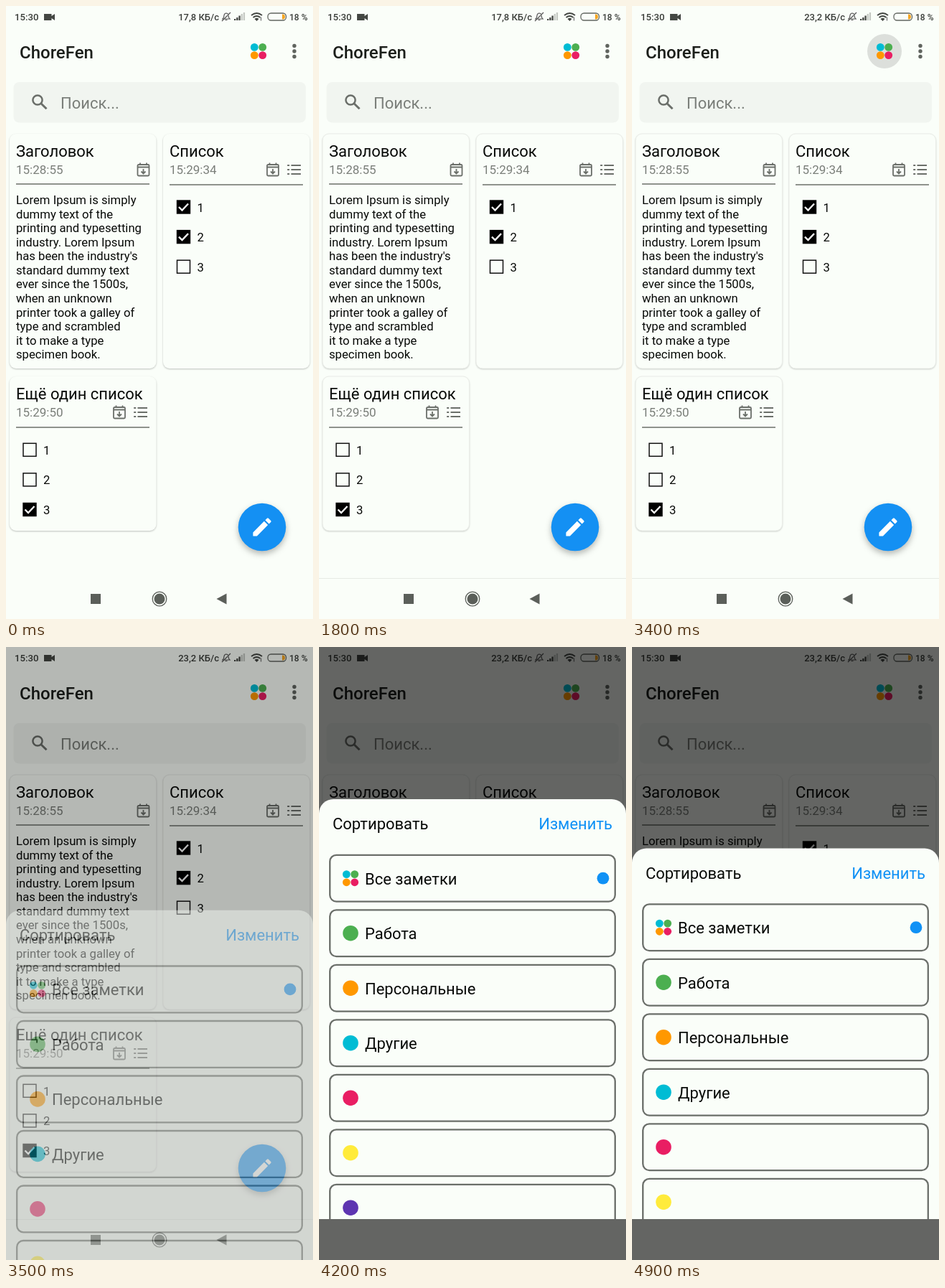
These frames come from a looping animation (428 by 854 pixels, 5000 ms). An HTML page:

```html
<!DOCTYPE html>
<html lang="ru">
<head>
<meta charset="utf-8">
<title>Заметки</title>
<style>
  html, body { margin: 0; width: 100%; height: 100%; overflow: hidden; background: #fafef9; }
  svg { display: block; width: 100vw; height: 100vh; }
  text { font-family: Roboto, "Noto Sans", sans-serif; font-size: 22px; fill: #080a08; white-space: pre; }
  .status { font-size: 13.2px; font-weight: 500; fill: #3b3e3a; }
  .title { font-size: 24px; font-weight: 500; fill: #1c1f1b; }
  .muted { fill: #7a7e79; }
  .small { font-size: 16.7px; }
  .time { font-size: 17px; fill: #7a7e79; }
  .line { fill: none; stroke: #6b6f6a; }
  .paper { fill: #fafef9; }
  .card { fill: #fafef9; filter: drop-shadow(0 1px 1px rgba(0, 0, 0, .24)); }
</style>
</head>
<body>
<svg viewBox="0 0 428 854" preserveAspectRatio="none">
  <defs>
    <g id="categories">
      <circle cx="-5.7" cy="-5.6" r="5.4" fill="#00bcd4"/>
      <circle cx="5.7" cy="-5.6" r="5.4" fill="#4caf50"/>
      <circle cx="-5.7" cy="5.6" r="5.4" fill="#ff9800"/>
      <circle cx="5.7" cy="5.6" r="5.4" fill="#e91e63"/>
    </g>
    <g id="archive" class="line" stroke-width="1.8">
      <rect x="-8" y="-7" width="16" height="15.5" rx="1.5"/>
      <path d="M-8-3.5H8M-4.5-9.5V-7M4.5-9.5V-7M0-1V5M-3 2.5L0 5.5L3 2.5"/>
    </g>
    <g id="list" class="line" stroke-width="2.2">
      <path d="M-9.3-6h3M-9.3 0h3M-9.3 6h3M-4-6H9.5M-4 0H9.5M-4 6H9.5"/>
    </g>
    <rect id="box" x="-9" y="-9" width="18" height="18" fill="none" stroke="#111" stroke-width="1.5"/>
    <g id="boxOn">
      <rect x="-9.7" y="-9.7" width="19.4" height="19.4"/>
      <path d="M-6.5 0L-2 4.5L6.5-4.5" fill="none" stroke="#fff" stroke-width="2.3"/>
    </g>
    <clipPath id="window"><rect width="428" height="797"/></clipPath>
  </defs>

  <rect class="paper" width="428" height="854"/>

  <g id="statusBar" fill="#444743">
    <text class="status" x="12" y="20">15:30</text>
    <path d="M53 11h10.5v3l4.5-3v9l-4.5-3v3H53z"/>
    <text class="status" id="speed" x="297" y="20" text-anchor="end" style="font-size:13px"></text>
    <path d="M302 18q2-2 2-5q.5-3 3-3t3 3q0 3 2 5zM305.500 19.500h3M301 21L313 9" fill="none" stroke="#555" stroke-width="1.2"/>
    <path d="M318 20v-2h2.300v2zM321.200 20v-4h2.300v4zM324.400 20v-6.500h2.300v6.500z"/>
    <path d="M327.600 20v-9h2.300v9zM330.800 20V9h2.300v11z" fill="#c5c9c3"/>
    <path d="M342 13q7.500-6 15 0M344.500 16q5-4 10 0" fill="none" stroke="#444743" stroke-width="1.8"/>
    <path d="M346.500 18q3-2.400 6 0l-3 3z"/>
    <path d="M355.500 15.500v5" stroke="#777" stroke-width="1.3"/>
    <rect x="365" y="10" width="25.500" height="10" rx="4.500" fill="none" stroke="#626660" stroke-width="1.3"/>
    <path d="M385 11.500h1.500q2.500.5 2.500 3.500t-2.500 3.500H385z" fill="#f5a623"/>
    <text class="status" x="395" y="19.500" style="font-size:12px">18 %</text>
  </g>

  <text class="title" x="19" y="72.500">ChoreFen</text>
  <circle id="ripple" cx="352" cy="63"/>
  <use href="#categories" x="352" y="63"/>
  <g fill="#60645f"><circle cx="402" cy="55.500" r="2.700"/><circle cx="402" cy="63" r="2.700"/><circle cx="402" cy="70.500" r="2.700"/></g>

  <rect x="10.500" y="106" width="407.500" height="56.500" rx="8" fill="#f1f5f0"/>
  <g class="line" stroke="#666"><circle cx="44" cy="131" r="6.600" stroke-width="2.500"/><path d="M48.800 135.800L56.500 143.300" stroke-width="3"/></g>
  <text class="muted" x="76" y="143">Поиск...</text>

  <g id="cards"></g>

  <circle cx="357" cy="726" r="33.300" fill="#1490f3" style="filter:drop-shadow(0 4px 4px rgba(0,0,0,.28))"/>
  <path transform="translate(340.200 709.200) scale(1.400)" fill="#fff"
    d="M3 17.460v3.040c0 .28.22.5.5.5h3.040c.13 0 .26-.05.35-.15L17.810 9.940l-3.750-3.750L3.150 17.100q-.15.15-.15.36zM20.710 7.040a1 1 0 0 0 0-1.410l-2.340-2.340a1 1 0 0 0-1.410 0l-1.830 1.830l3.750 3.750z"/>

  <path id="navLine" d="M0 797.500H428" stroke="#e6eae4"/>
  <g id="nav" fill="#5b5f5a">
    <rect x="118" y="819" width="14" height="14"/>
    <circle cx="214" cy="826" r="7.500"/>
    <circle cx="214" cy="826" r="9.800" fill="none" stroke="#5b5f5a" stroke-width="1.300"/>
    <path d="M293.500 826L307.500 818.500V833.500z"/>
  </g>

  <rect id="dim" width="428" height="854"/>
  <g id="popup">
    <g clip-path="url(#window)">
      <g id="sheet">
        <rect class="paper" width="428" height="900" rx="20"/>
        <text x="19" y="42">Сортировать</text>
        <text x="409" y="42" text-anchor="end" style="fill:#1091f5">Изменить</text>
        <g id="rows"></g>
      </g>
    </g>
  </g>
</svg>
<script>
const $ = id => document.getElementById(id);
const use = (id, x, y) => `<use href="#${id}" x="${x}" y="${y}"/>`;
const label = (cls, x, y, s) => `<text class="${cls}" x="${x}" y="${y}">${s}</text>`;

function card(x, y, height, title, time, ruleY, body, isList) {
  const calendarX = x + (isList ? 153 : 186.5);
  return `<rect class="card" x="${x}" y="${y}" width="204.500" height="${height}" rx="9"/>
    <rect class="edge" x="${x}" y="${y}" width="204.500" height="${height}" rx="9" fill="none" stroke="#eaede8"/>` +
    label('', x + 9, y + 32, title) + label('time', x + 9, y + 56, time) +
    use('archive', calendarX, y + 50) + (isList ? use('list', x + 182.5, y + 50) : '') +
    `<path class="line" d="M${x + 9} ${ruleY}h186" stroke-width="1.300"/>` + body;
}

const checks = (x, y, states) => states.map((on, i) => {
  const rowY = y + i * 41.6;
  return use(on ? 'boxOn' : 'box', x, rowY) + label('small', x + 19, rowY + 6.5, i + 1);
}).join('');

const lorem = ['Lorem Ipsum is simply', 'dummy text of the', 'printing and typesetting',
  'industry. Lorem Ipsum', "has been the industry's", 'standard dummy text', 'ever since the 1500s,',
  'when an unknown', 'printer took a galley of', 'type and scrambled', 'it to make a type', 'specimen book.'];
const paragraph = lorem.map((s, i) => label('small', 14, 276 + i * 19.57, s)).join('');

$('cards').innerHTML =
  card(5, 178, 327, 'Заголовок', '15:28:55', 248, paragraph, false) +
  card(219, 178, 327, 'Список', '15:29:34', 249, checks(247.5, 280, [1, 1, 0]), true) +
  card(5, 516, 215, 'Ещё один список', '15:29:50', 587, checks(33, 618.3, [0, 0, 1]), true);

const rows = [['', 'Все заметки'], ['#4caf50', 'Работа'], ['#ff9800', 'Персональные'],
  ['#00bcd4', 'Другие'], ['#e91e63', ''], ['#ffeb3b', ''], ['#5e35b1', '']];
$('rows').innerHTML = rows.map(([color, name], i) => {
  const y = 110.2 + i * 76.5;
  return `<rect class="line" x="15.200" y="${y - 32.4}" width="397.600" height="64.800" rx="9" stroke-width="2.300"/>` +
    (color ? `<circle cx="44" cy="${y}" r="10.800" fill="${color}"/>`
           : use('categories', 44, y) + `<circle cx="396" cy="${y}" r="8.400" fill="#1091f5"/>`) +
    label('', 64, y + 8.5, name);
}).join('');

// Sheet top edge by time in ms; a step holds until the next one.
const sheetSteps = [[0, 270], [4000, 262], [4100, 240], [4200, 212], [4300, 190], [4400, 179],
  [4500, 176], [4700, 196], [4800, 236], [4900, 280.5]];
const held = (steps, t) => steps.filter(([at]) => at <= t).pop()[1];
const edges = document.querySelectorAll('.edge');

function draw(t) {
  const opening = t >= 3500 && t < 3600;
  const open = t >= 3600;
  $('speed').textContent = t < 3000 ? '17,8 КБ/с' : '23,2 КБ/с';
  $('ripple').setAttribute('r', t < 3300 || t >= 3500 ? 0 : t < 3400 ? 18 : 24);
  $('ripple').setAttribute('fill-opacity', t < 3400 ? .07 : .12);
  const settled = t >= 400 ? 1 : 0;
  edges.forEach(edge => edge.style.opacity = settled);
  $('navLine').style.opacity = settled && !open ? 1 : 0;
  $('nav').style.opacity = open ? 0 : 1;
  $('dim').style.opacity = open ? .6 : opening ? .28 : 0;
  $('popup').style.opacity = open ? 1 : opening ? .43 : 0;
  $('popup').setAttribute('transform', `translate(0 ${opening ? 96.7 : 0})`);
  $('sheet').setAttribute('transform', `translate(0 ${held(sheetSteps, t)})`);
}

const start = performance.now();
function tick() {
  draw((performance.now() - start) % 5000);
  requestAnimationFrame(tick);
}
tick();
</script>
</body>
</html>
```
